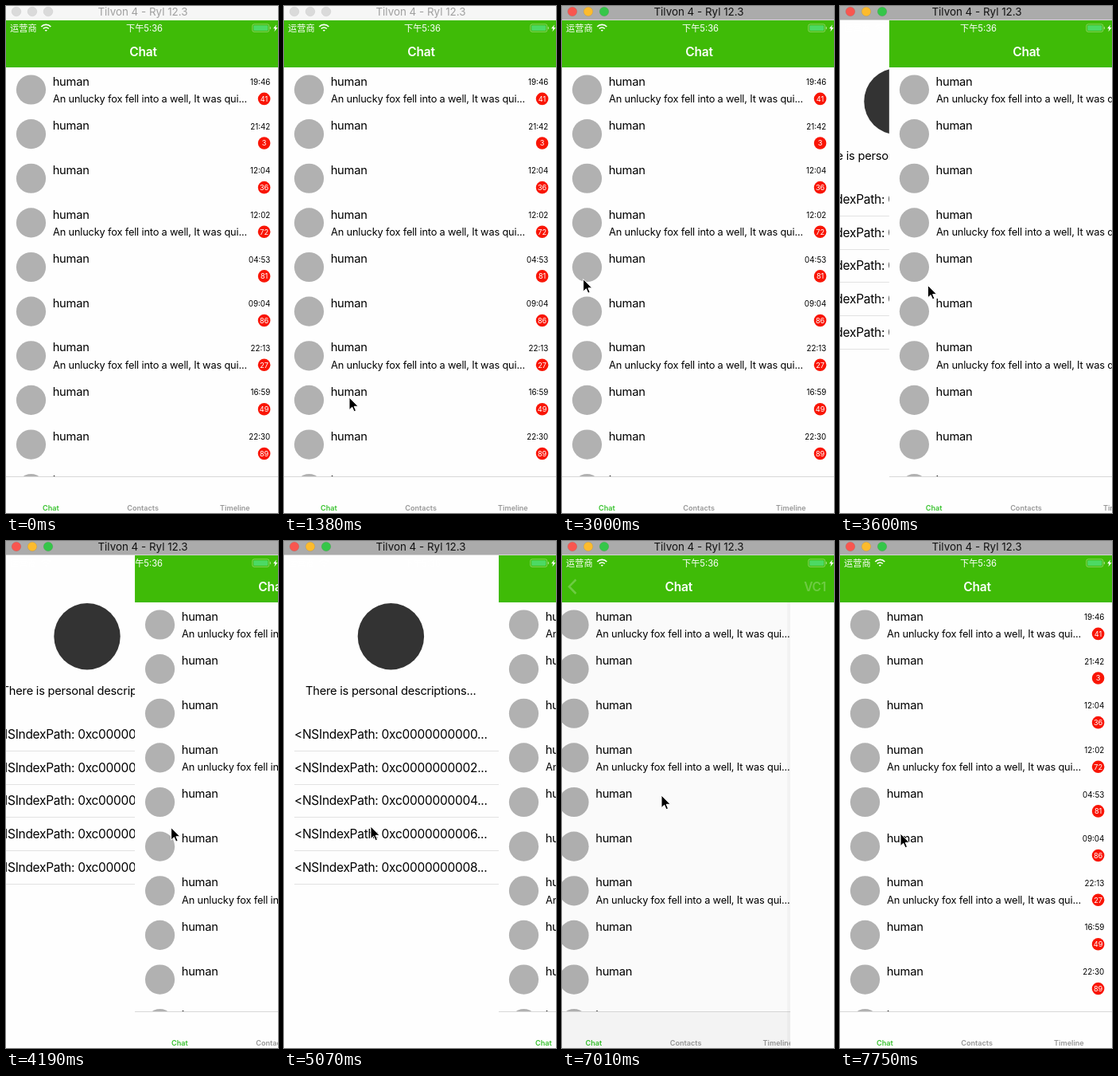
Animation of 342 by 636 pixels, one loop 8000 ms. Source, as an HTML page:

```html
<!DOCTYPE html>
<html lang="en">
<head>
<meta charset="utf-8">
<title>Chat drawer</title>
<style>
  html, body { margin: 0; width: 100%; height: 100%; overflow: hidden; background: #fefefe; }
  svg { display: block; width: 342px; height: 636px; font-family: Inter, "Noto Sans CJK SC", "Noto Sans CJK", sans-serif; }
  .name { font-size: 14.7px; letter-spacing: -.25px; }
  .message { font-size: 12.8px; letter-spacing: -.17px; }
  .time { font-size: 9.8px; text-anchor: end; }
  .badge { font-size: 9.2px; fill: #fff; text-anchor: middle; }
  .item { font-size: 15.5px; letter-spacing: -.28px; }
  .tab { font-size: 9.1px; font-weight: 600; text-anchor: middle; }
  .nav { font-size: 15.5px; font-weight: 600; letter-spacing: -.2px; text-anchor: middle; fill: #fff; }
  .status { font-size: 11.2px; fill: #fff; }
  .window { font-size: 13.4px; text-anchor: middle; }
</style>
</head>
<body>
<svg id="stage" viewBox="0 0 342 636"></svg>
<script>
const LOOP = 8000, WIDTH = 342, DRAWER = 270;
const PAPER = '#fefefe', GREEN = '#3fbb07';
const stage = document.getElementById('stage');

function set(node, attrs) {
  for (const key in attrs) node.setAttribute(key, attrs[key]);
  return node;
}
function add(parent, tag, attrs) {
  return parent.appendChild(set(document.createElementNS('http://www.w3.org/2000/svg', tag), attrs));
}
const group = (parent, attrs = {}) => add(parent, 'g', attrs);
const rect = (parent, x, y, width, height, fill, more = {}) =>
  add(parent, 'rect', { x, y, width, height, fill, ...more });
const circle = (parent, cx, cy, r, fill, more = {}) => add(parent, 'circle', { cx, cy, r, fill, ...more });
function text(parent, content, x, y, style, more = {}) {
  const node = add(parent, 'text', { x, y, class: style, ...more });
  node.textContent = content;
  return node;
}

// Drawer
rect(stage, 0, 0, WIDTH, 636, PAPER);
const drawer = group(stage);
circle(drawer, 134.4, 119.8, 41.7, '#333');
text(drawer, 'There is personal descriptions...', 27, 193, 'name');
for (let i = 0; i < 5; i++) {
  const y = Math.round(41.7 * i);
  text(drawer, `<NSIndexPath: 0xc000000000${2 * i}...`, 13, 248 + y, 'item');
  rect(drawer, 13, 263 + y, DRAWER - 13, 1, '#e2e2e2', { 'shape-rendering': 'crispEdges' });
}

// Chat page
const main = group(stage);
rect(main, 0, 18, WIDTH, 618, PAPER);
const chat = group(main);
rect(chat, 0, 77, WIDTH, 559, PAPER);
const times = '19:46 21:42 12:04 12:02 04:53 09:04 22:13 16:59 22:30'.split(' ');
const counts = '41 3 36 72 81 86 27 49 89'.split(' ');
for (let i = 0; i < 10; i++) {
  const row = group(chat, { transform: `translate(0 ${55.63 * i})` });
  circle(row, 31.5, 105, 18.6, '#b1b1b1');
  text(row, 'human', 58.7, 99.7, 'name');
  if (i % 3 === 0) text(row, 'An unlucky fox fell into a well, It was qui...', 59, 121.2, 'message');
  if (!times[i]) continue;
  text(row, times[i], 332.3, 99, 'time');
  circle(row, 324.6, 116.4, 7.8, '#f91505');
  text(row, counts[i], 324.6, 119.8, 'badge');
}
const tabBar = rect(chat, 0, 590, WIDTH, 46, PAPER);
rect(chat, 0, 590, WIDTH, 1, '#d8d8d8');
['Chat', 'Contacts', 'Timeline'].forEach((label, i) =>
  text(chat, label, 56.3 + 115.8 * i, 633, 'tab', { fill: i ? '#979797' : '#36c22c' }));
const dim = rect(main, 0, 77, WIDTH, 559, '#000');

// Pushed page
const detail = group(main);
rect(detail, -4, 77, 4, 559, '#000', { opacity: .03 });
rect(detail, 0, 77, WIDTH, 559, '#fdfdfd');

// Navigation bar
rect(main, 0, 18, WIDTH, 59, GREEN);
const chatTitle = text(main, 'Chat', 0, 63, 'nav');
const detailTitle = text(main, 'VC1', 0, 63, 'nav');
const back = add(main, 'path', { d: 'M17.5 48.5L9 57.2L17.5 66', fill: 'none', stroke: '#fff', 'stroke-width': 2.6 });

// Status bar stays in place above the sliding pages
const status = group(stage);
text(status, '运营商', 5, 31.7, 'status');
text(status, '下午5:36', 174, 31.7, 'status', { 'text-anchor': 'middle' });
const wifi = group(status, { fill: 'none', stroke: '#fff', 'stroke-width': 1.7 });
for (const r of [1.2, 4.6, 8]) {
  const d = r * .75;
  add(wifi, 'path', { d: `M${50.3 - d} ${32 - d}A${r} ${r} 0 0 1 ${50.3 + d} ${32 - d}` });
}
rect(status, 309.8, 22.8, 21, 9.6, 'none', { rx: 2.2, stroke: '#fff', 'stroke-opacity': .4, 'stroke-width': .9 });
rect(status, 311.2, 24.2, 18.2, 6.8, '#4cd964', { rx: 1 });
rect(status, 331.8, 26, 1.2, 3.2, '#fff', { rx: .6, opacity: .5 });
add(status, 'path', { d: 'M340 23.5L336 28.3h2.4l-1 4 4.2-5.2h-2.5z', fill: '#fff' });

// Window bar
const bar = rect(stage, 0, 0, WIDTH, 17.5);
const lights = ['#f9564f', '#fdbb2d', '#35c649'].map((color, i) =>
  ({ color, node: circle(stage, 13 + 20 * i, 7, 5.8, color, { 'stroke-width': .5 }) }));
const windowTitle = text(stage, 'Tilvon 4 - Ryl 12.3', 172, 11.8, 'window');

const cursor = add(stage, 'path', {
  d: 'M0 0V15.6L3.7 12.2L6.1 17.7L8.5 16.6L6.2 11.3H11.2Z',
  stroke: '#fff', 'stroke-width': 1, 'stroke-linejoin': 'round'
});

// Motion
const APPEAR = 1380, ACTIVATE = 2700, RELEASE = 4500, PUSH = 5500, STEP = 148.1;
const progress = (t, from, to) => Math.min(1, Math.max(0, (t - from) / (to - from)));
const ease = (t, from, to) => (1 - Math.cos(Math.PI * progress(t, from, to))) / 2;
const mix = (a, b, k) => a + (b - a) * k;
const move = (node, x, y = 0) => set(node, { transform: `translate(${x} ${y})` });

// Screen updates come at a steady, slow rate
const hold = t => t < APPEAR ? 0 : APPEAR + STEP * Math.floor((t - APPEAR) / STEP + .12);

const glides = [
  { from: APPEAR, to: 2260, x: 21, y: 342 },
  { from: 2830, to: RELEASE, x: 224, y: 361 },
  { from: RELEASE, to: 5000, x: 109, y: 358 },
  { from: 5970, to: 6550, x: 30, y: 52 },
  { from: 6720, to: 7000, x: 125, y: 319 },
  { from: 7000, to: 7740, x: 76, y: 367 }
];
function pointer(t) {
  return glides.reduce(([x, y], glide) => {
    const k = ease(t, glide.from, glide.to);
    return [mix(x, glide.x, k), mix(y, glide.y, k)];
  }, [82, 491]);
}

// The drawer follows the drag, springs open on release and closes on a tap
function opening(t) {
  if (t < ACTIVATE) return 0;
  const dragged = Math.max(0, 1.03 * (pointer(Math.min(t, RELEASE))[0] - 50.3));
  return mix(mix(dragged, DRAWER, ease(t, RELEASE, 4780)), 0, ease(t, 5420, 5660));
}

// 0 shows the pushed page, 1 the chat list
const popping = t => t < PUSH ? 1 : 1 - (1 - progress(t, 6780, 7160)) ** 2;

function render(time) {
  const t = hold(time);
  const active = t >= ACTIVATE;
  const open = opening(t), pop = popping(t);

  move(drawer, (open - DRAWER) * .3);
  move(main, open);
  move(chat, -.3 * WIDTH * (1 - pop));
  move(detail, WIDTH * pop);
  set(detail, { visibility: pop < 1 ? 'visible' : 'hidden' });
  set(dim, { opacity: .1 * (1 - pop) });
  set(tabBar, { fill: pop < 1 ? '#f7f7f7' : PAPER });

  const fade = pop < 1 ? 1 - .9 * pop : 0;
  set(chatTitle, { x: mix(41, 172.5, pop ** 1.25) });
  chatTitle.style.fontWeight = pop ? 600 : 400;
  set(detailTitle, { x: 172.5 + 173.5 * pop, opacity: fade });
  set(back, { opacity: fade });

  set(bar, { fill: active ? '#ababab' : '#f6f6f6' });
  set(windowTitle, { fill: active ? '#111' : '#9f9f9f' });
  for (const { node, color } of lights) {
    set(node, { fill: active ? color : '#dadada', stroke: active ? 'rgba(0,0,0,.15)' : '#cacaca' });
  }

  move(cursor, ...pointer(t));
  set(cursor, { visibility: t >= APPEAR ? 'visible' : 'hidden' });
}

const start = performance.now();
function frame(now) {
  render(Math.max(0, now - start) % LOOP);
  requestAnimationFrame(frame);
}
render(0);
requestAnimationFrame(frame);
</script>
</body>
</html>
```
